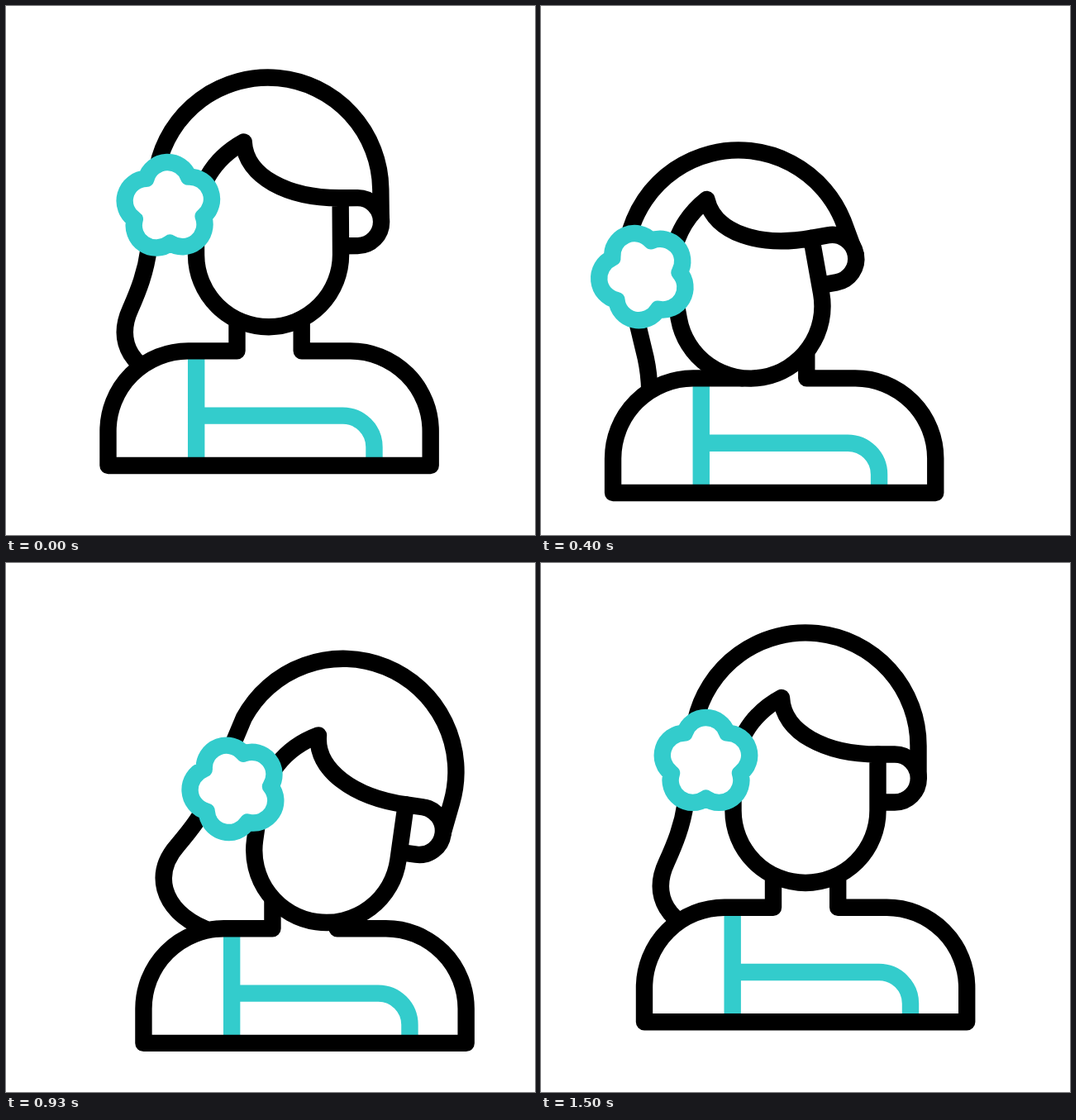
Recreate the animation shown at these times as an HTML page. Size 640 by 640 pixels, loop 1670 ms.

```html
<!DOCTYPE html>
<html lang="en">
<head>
<meta charset="utf-8">
<title>Dancing woman</title>
<style>
  html, body { margin: 0; width: 100%; height: 100%; overflow: hidden; background: #fff; }
  svg { display: block; width: 100vw; height: 100vh; }
</style>
</head>
<body>
<svg viewBox="0 0 640 640" fill="none" stroke="#000" stroke-width="20.4"
     stroke-linecap="round" stroke-linejoin="round">
  <g id="hairBase">
    <path id="hair" d="M456.5 260V221A136.5 136.5 0 0 0 186.6 192L175 290
      C171 318 162 340 152 362C143 381 142 400 152 417C163 435 182 446 212 450"/>
  </g>
  <g id="body">
    <path fill="#fff" stroke="none" d="M281 370V416.7H222A97 97 0 0 0 125 514V555.3H515.2V514
      A97 97 0 0 0 418 416.7H359.2V370"/>
    <path stroke="#3cc" stroke-linecap="butt" d="M231.7 420V552M232 495H409A38 38 0 0 1 447 533V552"/>
    <path stroke-linecap="butt" d="M281 370V416.7H222A97 97 0 0 0 125 514V555.3H515.2V514
      A97 97 0 0 0 418 416.7H359.2V370"/>
  </g>
  <g id="head">
    <path fill="#fff" d="M407.5 231.5H428A28.8 29 0 0 1 428 289.5H407.5"/>
    <path fill="#fff" d="M407.5 231.5V299.5A87.5 87.5 0 0 1 232.5 299.5V262
      C232.5 220 252 184 291 163C293 205 344 231.5 407.5 231.5Z"/>
    <path id="flower" fill="#fff" stroke="#3cc"/>
  </g>
</svg>
<script>
const LOOP = 1670, FPS = 30, LAST = 45;
const $ = id => document.getElementById(id);

// Five round petals meeting at evenly spaced notches
function petals(radius, notch) {
  let d = '';
  for (let i = 0; i <= 5; i++) {
    const a = (i * 72 - 36) * Math.PI / 180;
    const p = `${(notch * Math.sin(a)).toFixed(2)} ${(-notch * Math.cos(a)).toFixed(2)}`;
    d += i ? `A${radius} ${radius} 0 0 1 ${p}` : `M${p}`;
  }
  return d + 'Z';
}

const smooth = u => u * u * (3 - 2 * u);

// Steeper ease, the same as cubic-bezier(.5, 0, .5, 1)
function steep(u) {
  let k = u - 0.5;
  for (let i = 0; i < 6; i++) {
    k -= (k * k * k + 0.75 * k + 0.5 - u) / (3 * k * k + 0.75);
  }
  return smooth(k + 0.5);
}

// Each move: start time, end time, end value, ease
function track(...moves) {
  return t => {
    let v = 0;
    for (const [from, to, end, ease = smooth] of moves) {
      const u = Math.min(1, Math.max(0, (t - from) / (to - from)));
      v += (end - v) * ease(u);
    }
    return v;
  };
}

const START = -33;
const bodyX = track([START, 267, -45], [267, 875, 45, steep], [870, 1237, 0]);
const bodyY = track([START, 360, 33.7], [790, 1240, 0]);
const headX = track([START, 267, -73], [311, 858, 73, steep], [870, 1255, 0]);
const headY = track([START, 360, 63.7], [780, 1255, 0]);
const tilt = track([START, 267, -10.8], [330, 820, 10.8, steep], [780, 1240, 0]);
const spin = track([START, 267, -72], [267, 862, -360, steep], [835, 1500, -720]);

function draw(ms) {
  const frame = Math.min(LAST, Math.floor((ms % LOOP + 5) * FPS / 1000));
  const t = frame * 1000 / FPS;
  const a = tilt(t);
  const pose = `translate(${headX(t)} ${headY(t)}) rotate(${a} 320 299.5)`;
  $('body').setAttribute('transform', `translate(${bodyX(t)} ${bodyY(t)})`);
  $('head').setAttribute('transform', pose);
  $('hairBase').setAttribute('transform', pose);
  $('hair').setAttribute('transform', `rotate(${a} 456.5 260)`);
  $('flower').setAttribute('transform', `translate(199.5 241) rotate(${spin(t) - a})`);
}

$('flower').setAttribute('d', petals(27, 43.7));

function tick() {
  draw(performance.now());
  requestAnimationFrame(tick);
}
tick();
</script>
</body>
</html>
```
